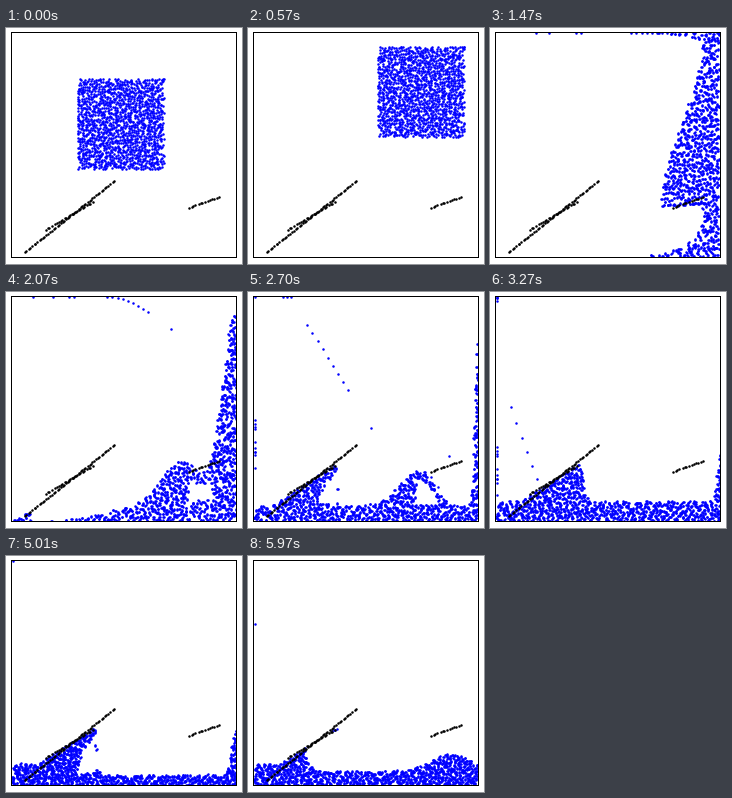
Write a matplotlib script that moves like this. It is 236 px wide and 236 px high and loops after 6 s.

```python
import numpy as np
import matplotlib.pyplot as plt
from matplotlib.animation import FuncAnimation

SIZE, DPI = 236, 100
FRAMES, STEP = 200, 30
LEFT, RIGHT, TOP, FLOOR = 5, 230, 4, 229
HALF_G = 0.075          # half the gravity, px per step squared
HIT = 23                # the block meets the right wall
COLS, PER_COL = 40, 19

rng = np.random.default_rng(4)
n = COLS * PER_COL
X = np.linspace(6, 230, 449)
Y = np.linspace(5, 229, 225)


def track(t, *keys):
    """Value at t along straight moves between (time, value) keys."""
    return np.interp(t, *zip(*keys))


def smooth(k):
    k = np.clip(k, 0, 1)
    return k * k * (3 - 2 * k)


def spread(q, grid, weight):
    """Place quantiles q along grid in proportion to weight."""
    mid = (weight[1:] + weight[:-1]) / 2 + 1e-6
    c = np.concatenate([[0], np.cumsum(mid)])
    return np.interp(q, c / c[-1], grid)


# Evenly scattered sites; each carries a pair of particles
i = np.arange(n)
a = (i * 0.7548776662 + rng.normal(0, 0.008, n)) % 1
b = (i * 0.5698402910 + rng.normal(0, 0.008, n)) % 1
ang = rng.uniform(0, 2 * np.pi, n)
off = np.stack([np.cos(ang), np.sin(ang)])
phase = rng.uniform(0, 2 * np.pi, (2, n))


def pile_width(t):
    """Thickness of the water against the right wall at each height."""
    y0 = track(t, (23, 18), (49, 5), (64, 60))
    y1 = track(t, (23, 19), (49, 178), (64, 200))
    bottom = track(t, (23, 109), (49, 179), (64, 212))
    body = track(t, (23, 87), (49, 42), (64, 55)) * smooth((Y - y0) / (y1 - y0))
    body = body * np.clip((bottom - Y) / 2 + 0.5, 0, 1)
    film = track(t, (23, 0), (49, 15), (64, 8)) * (Y < 109 + 6.4 * (t - HIT))
    roof_jet = track(t, (23, 0), (49, 50), (64, 0)) * np.exp((5 - Y) / 3.5)
    floor_jet = max(8 * (t - 41), 0) * np.exp((Y - 229) / 10)
    return np.minimum(body + film + roof_jet + floor_jet, 223)


def on_wall(t):
    w = pile_width(t)
    y = spread(b, Y, w)
    return np.stack([229 - (1 - a) * np.interp(y, Y, w), y])


def floor_shape(t):
    """Surface of the water on the floor, and roof and base of the air pockets."""
    level = track(t, (62, 12), (90, 15), (110, 20), (130, 13), (167, 10),
                  (185, 10), (199, 14))
    tilt = track(t, (110, 0), (130, 6), (148, 0))
    front = track(t, (62, 130), (90, -40))
    pool = (level - tilt * (X - 118) / 112) / (1 + np.exp((front - X) / 12))

    # Heap climbing under the left bars up to a tip
    tip = track(t, (62, 0), (74, 30), (90, 88), (130, 94), (148, 92),
                (167, 89), (183, 72), (199, 57))
    fall = track(t, (90, 1), (110, 3), (130, 25), (148, 8), (167, 1.5), (183, 4))
    bank = track(t, (76, 0), (90, 14), (130, 21))
    heap = np.maximum(bank, 26 + 0.65 * (np.minimum(X, tip) - 40))
    drop = np.exp(-np.clip(X - tip, 0, None) / fall)
    h = pool + np.clip(heap - pool, 0, None) * drop

    # Water pouring off the right bar
    sd = np.where(X < 172, 20, track(t, (62, 24), (90, 13)))
    h += track(t, (62, 45), (90, 36), (106, 0)) * np.exp(-((X - 172) / sd) ** 2 / 2)

    # Run-up on the right wall, later a swell rolling back
    amp = track(t, (62, 205), (90, 170), (112, 30), (130, 0), (150, 0),
                (167, 46), (183, 30), (199, 17))
    wide = track(t, (62, 25), (76, 12), (90, 4), (150, 4), (167, 6), (183, 24),
                 (199, 28))
    mid = track(t, (180, 230), (199, 203))
    h += amp * np.exp(-((X - mid) / wide) ** 2)

    top = 229 - np.clip(h, 0, 224)
    base = 227 - level
    curl = track(t, (80, 0), (90, 1), (110, 0), (150, 0), (167, 1), (183, 0))
    under_tip = curl * np.clip((X - tip + 18) / 4, 0, 1) * (X < tip + 1)
    under_bar = track(t, (90, 1), (104, 0)) * np.clip(
        (15 - abs(X - track(t, (62, 197), (90, 180)))) / 4, 0, 1)
    roof = base - under_tip * np.clip(
        base - (top + 7 + 0.6 * (tip - X)), 0, None)
    roof = roof - under_bar * np.clip(base - np.maximum(top + 10, 181), 0, None)
    return top, roof, base


def on_floor(t):
    top, roof, base = floor_shape(t)
    upper = np.clip(roof - top, 0, None)
    lower = 229 - np.maximum(base, top)
    x = spread(u, X, upper + lower)
    up, low, r = (np.interp(x, X, c) for c in (upper, lower, roof))
    h = v * (up + low)
    return np.stack([x, np.where(h <= low, 229 - h, r - (h - low))])


def column_ranks(pos):
    order = np.argsort(pos[0])
    u, v = np.empty(n), np.empty(n)
    u[order] = (np.arange(n) + 0.5) / n
    for col in order.reshape(COLS, PER_COL):
        low_first = col[np.argsort(-pos[1, col])]
        v[low_first] = (np.arange(PER_COL) + rng.uniform(0, 1, PER_COL)) / PER_COL
    return u, v


u, v = column_ranks(on_wall(64))


def water(t):
    if t < HIT:
        pair = []
        for d in (off * 1.15, off * -1.15):
            x = np.clip((a - 0.5) * 86 + d[0], -43, 43)
            y = np.clip((b - 0.5) * 90 + d[1], -45, 45)
            pair.append([114.5 + x + 3.08 * t,
                         96 + y - 3.12 * t + HALF_G * t * t])
        return np.hstack(pair)
    k = smooth((t - 58) / 14)
    pos = on_wall(t) if k == 0 else on_wall(t) * (1 - k) + on_floor(t) * k
    calm = min((t - HIT) / 12, 1)
    pos = pos + calm * 0.6 * np.sin(phase + t * 0.12)
    d = off * (1.15 - 0.75 * calm)
    return np.hstack([pos + d, pos - d])


# Drops thrown off the main body
stream = np.append(np.linspace(33, 98, 9), 136)
runners = [(91, 43, 102), (86, 39, 105), (59, 35, 106), (46, 7, 170)]
spray = rng.uniform(115, 190, 10)
drips = np.array([(201, 164), (190, 195), (195, 207), (183, 185)]).T
stuck = np.stack([np.linspace(84, 89, 4), np.linspace(175, 173, 4)])


def shown(pos, ok):
    return np.where(ok, pos, np.nan)


def drops(t):
    # Falling off the ceiling one after another
    leave = 90 - np.sqrt((stream - 5) / HALF_G)
    x = np.minimum(39 + 0.62 * stream + 2 * (90 - t), 229)
    y = 5 + HALF_G * np.clip(t - leave, 0, None) ** 2
    out = [shown(np.stack([x, y]), (t > 36) & (y < 213))]

    # Racing along the ceiling, then sliding down the left wall
    for x1, x2, slip in runners:
        x = track(t, (32, 229), (49, x1), (90, x2), (slip, 6.5))
        y = 5 + HALF_G * max(t - slip, 0) ** 2
        out.append(shown(np.array([[x], [y]]), t > 32 and y < 208))

    y = spray + (0.2 if t < 90 else HALF_G) * (t - 90) ** 2
    out.append(shown(np.stack([np.full(len(y), 6.5), y]), y < 213))

    p = drips + np.array([[0], [1.5 * (t - 90)]])
    out.append(shown(p, (78 < t < 105) & (p[1] < 213)))
    out.append(shown(stuck, t > 175))
    return np.hstack(out)


def bar(x0, y0, x1, y1):
    m = int(np.hypot(x1 - x0, y1 - y0) / 2.2)
    k = np.clip((np.arange(m) + rng.uniform(-0.45, 0.45, m)) / (m - 1), 0, 1)
    k[[0, -1]] = 0, 1
    return np.stack([x0 + k * (x1 - x0), y0 + k * (y1 - y0)])


fig = plt.figure(figsize=(SIZE / DPI, SIZE / DPI), dpi=DPI, facecolor="white")
ax = fig.add_axes([LEFT / SIZE, 1 - FLOOR / SIZE,
                   (RIGHT - LEFT) / SIZE, (FLOOR - TOP) / SIZE])
ax.set(xlim=(LEFT, RIGHT), ylim=(FLOOR, TOP), xticks=[], yticks=[])
for spine in ax.spines.values():
    spine.set_linewidth(72 / DPI)

style = dict(ls="", marker="o", ms=1.8, mew=0)
blue, = ax.plot([], [], color="blue", **style)
bars = np.hstack([bar(19, 224, 108, 153), bar(40, 201.5, 87, 174),
                  bar(183, 179.5, 213, 169)])
ax.plot(*bars, color="black", **style)


def draw(t):
    x, y = np.hstack([water(t), drops(t)])
    blue.set_data(np.clip(x, 6, 229.5), np.clip(y, 5, 228.5))
    return blue,


anim = FuncAnimation(fig, draw, frames=FRAMES, interval=STEP,
                     repeat=True, repeat_delay=0)
plt.show()
```
